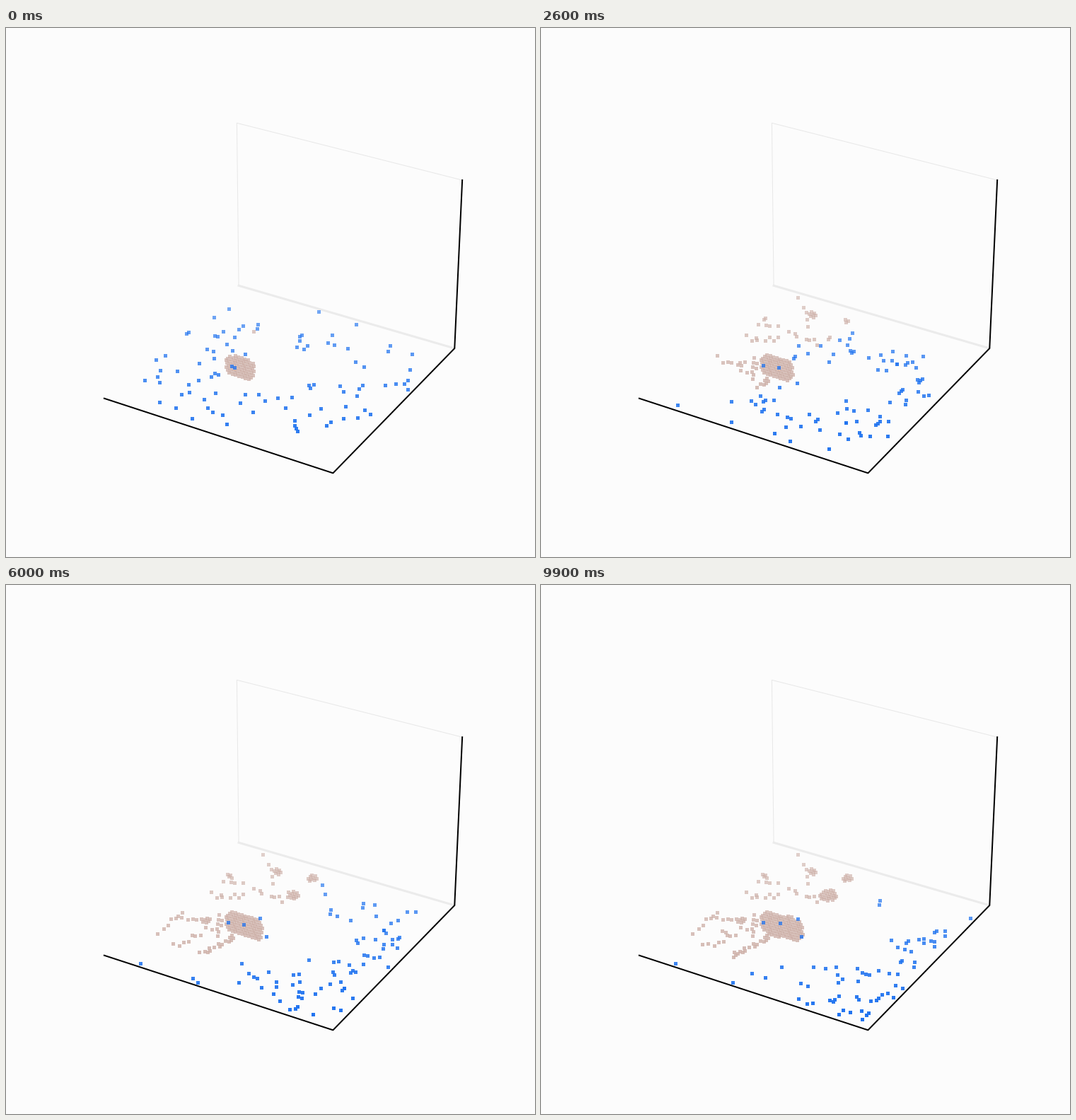
A matplotlib script for the animation above (10 s loop, 748 by 748 pixels).

```python
import numpy as np
import matplotlib.pyplot as plt
from matplotlib.animation import FuncAnimation

SIZE, DPI, FRAMES, N, WALKERS = 748, 100, 100, 64, 96
BLUE, BROWN = (0.13, 0.455, 0.943), (0.808, 0.695, 0.663)
rng = np.random.default_rng(12)

# Perspective camera: azimuth -60, elevation 30, distance 10
BOX = np.array([4, 4, 3]) * 1.8295 * 25 / 24 / np.sqrt(41)
AZIM, ELEV = np.radians([-60, 30])
TOWARD = np.array([np.cos(ELEV) * np.cos(AZIM),
                   np.cos(ELEV) * np.sin(AZIM), np.sin(ELEV)])
ACROSS = np.array([-np.sin(AZIM), np.cos(AZIM), 0])
UP = np.cross(TOWARD, ACROSS)
SIDE = 0.77 * SIZE
SCALE = SIDE / 0.185


def project(pts):
    """Unit-cube points to screen pixels, y down."""
    q = (np.asarray(pts, float) - 0.5) * BOX
    depth = 10 - q @ TOWARD
    x = q @ ACROSS / depth + 0.095
    y = q @ UP / depth + 0.095
    return np.column_stack([0.5125 * SIZE - SIDE / 2 + x * SCALE,
                            0.89 * SIZE - y * SCALE])


def to_screen(cells):
    flat = (np.asarray(cells) / N + 1 / 48) / (1 + 2 / 48)
    return project(np.column_stack([flat, np.zeros(len(flat))]))


CELLS = np.array([(i, j) for i in range(N + 1) for j in range(N + 1)])
GRID = to_screen(CELLS)


def nearest(x, y):
    return np.hypot(*(GRID - (x, y)).T).argmin()


def ring(cx, cy, rx, ry):
    """Distance of every cell from a centre, 1 on the ellipse."""
    return np.hypot((GRID[:, 0] - cx) / rx, (GRID[:, 1] - cy) / ry)


# ---- colonies: cells that settle once and stay ----
# centre, radii, first and last step of growth
CLUMPS = [(384, 406, 6, 5, 0, 20), (433, 414.5, 6.5, 5.5, 2, 40),
          (406, 439, 13, 8.5, 0, 85), (317, 412, 5, 4, 18, 36),
          (282, 474, 6, 4, 8, 45), (259, 490, 5, 2.5, 55, 95)]

# from, to, first and last step, cells
BRANCHES = [(302, 467, 300, 496, 1, 14, 6), (292, 473, 242, 472, 3, 32, 8),
            (248, 466, 216, 490, 20, 52, 6), (304, 482, 228, 511, 4, 65, 12),
            (324, 499, 272, 525, 1, 68, 22), (292, 436, 336, 442, 1, 17, 8),
            (306, 420, 332, 424, 1, 17, 5), (367, 385, 381, 421, 1, 17, 5),
            (353, 431, 390, 445, 0, 17, 7)]


def grow_colonies():
    birth = np.full(len(GRID), np.inf)

    def settle(cells, when):
        birth[cells] = np.minimum(birth[cells], when)

    # main body: a sheared rounded block that widens to the right
    for k in range(FRAMES):
        g = k / FRAMES
        x = GRID[:, 0] - (331 + 10 * g)
        y = GRID[:, 1] - (480 + 2.5 * g) - 0.26 * x
        block = (x / (20.5 + 10 * g)) ** 4 + (y / (15 + 1.5 * g)) ** 4
        settle(block < 1, k)

    for cx, cy, rx, ry, t0, t1 in CLUMPS:
        d = ring(cx, cy, rx, ry)
        settle(d < 1, t0 + (t1 - t0) * d[d < 1])

    for x0, y0, x1, y1, t0, t1, n in BRANCHES:
        for s in np.linspace(0, 1, n):
            x = x0 + (x1 - x0) * s + rng.normal(0, 2)
            y = y0 + (y1 - y0) * s + rng.normal(0, 2)
            settle(nearest(x, y), t0 + (t1 - t0) * s)
    return birth


# ---- walkers ----
# Spots where a walker gets trapped
TRAPS = [(190, 537), (269, 562), (315, 476), (337, 477), (363, 474),
         (368, 497)]


def pick(mask):
    """Random cells from a mask, ordered by angle around the middle."""
    ids = rng.choice(np.flatnonzero(mask), WALKERS, replace=False)
    x, y = (GRID[ids] - (395, 480)).T
    return ids[np.argsort(np.arctan2(2 * y, x))]


def walk():
    disc = ring(385, 481, 198, 95)
    first = pick((disc > 0.3) & (disc < 1))
    u, v = CELLS.T / N
    last = pick((u > 0.52) & (v < 0.93) & (ring(430, 488, 62, 52) > 1))

    # walkers follow the sorted order, so they stream around the middle
    start, goal = CELLS[first].astype(float), CELLS[last].astype(float)
    trapped = np.zeros(WALKERS, bool)
    for spot in TRAPS:
        dist = np.hypot(*(GRID[first] - spot).T)
        i = np.where(trapped, np.inf, dist).argmin()
        goal[i], trapped[i] = CELLS[nearest(*spot)], True

    # a quarter, from the back left, vanishes over time
    dist = np.hypot(*(GRID[first] - (330, 430)).T)
    lost = np.where(trapped, np.inf, dist).argsort()[:WALKERS // 4]
    death = np.full(WALKERS, np.inf)
    death[lost] = rng.uniform(3, FRAMES, len(lost))

    pull = np.where(trapped, 0.06, 0.03)[:, None]
    pos, path = start, []
    for k in range(FRAMES):
        path.append(to_screen(np.round(pos)))
        step = rng.integers(-1, 2, pos.shape).astype(float)
        step[trapped] *= np.exp(-k / 18)
        pos = np.clip(pos + pull * (goal - pos) + step, 0, N)
    return path, death


birth = grow_colonies()
path, death = walk()

fig = plt.figure(figsize=(SIZE / DPI, SIZE / DPI), dpi=DPI,
                 facecolor="#fcfcfc")
ax = fig.add_axes([0, 0, 1, 1])
ax.set(xlim=(0, SIZE), ylim=(SIZE, 0))
ax.axis("off")


def line(corners, color, px):
    ax.plot(*project(corners).T, color=color, lw=px * 72 / DPI,
            solid_capstyle="projecting", solid_joinstyle="round")


def dots(z):
    return ax.scatter([], [], marker="s", s=(5 * 72 / DPI) ** 2,
                      linewidths=0, zorder=z)


line([(0, 1, 0), (0, 1, 1), (1, 1, 1)], "#e8e8e8", 1)
line([(0, 1, 0), (1, 1, 0)], "#ebebeb", 3)
line([(0, 0, 0), (1, 0, 0), (1, 1, 0), (1, 1, 1)], "black", 2)
colony, walkers = dots(3), dots(4)


def place(artist, pts, color):
    # farther dots are fainter
    alpha = np.clip(1 - 0.4 * (605 - pts[:, 1]) / 220, 0.5, 1)
    artist.set_offsets(pts)
    artist.set_facecolor([(*color, a) for a in alpha])


def update(k):
    place(colony, GRID[birth <= k], BROWN)
    place(walkers, path[k][death > k], BLUE)
    return colony, walkers


anim = FuncAnimation(fig, update, frames=FRAMES, interval=100,
                     repeat=True, repeat_delay=0)
plt.show()
```
